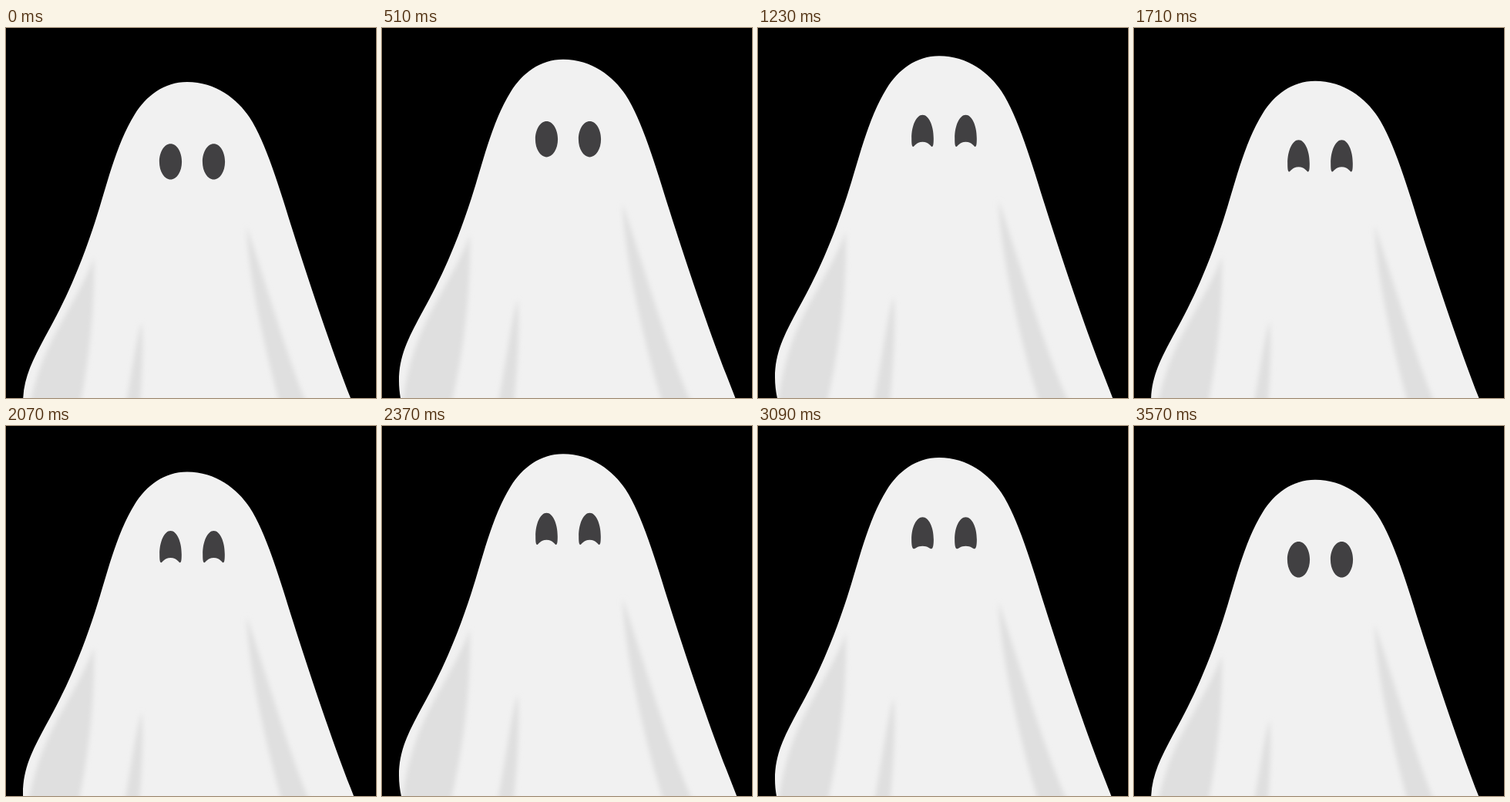
Animation of 480x480 px, one loop 3.6 s. Source, as an HTML page:

```html
<!DOCTYPE html>
<html lang="en">
<head>
<meta charset="utf-8">
<title>Floating ghost</title>
<style>
  html, body { margin: 0; width: 100%; height: 100%; overflow: hidden; background: #000; }
  svg { display: block; width: 100%; height: 100%; }
</style>
</head>
<body>
<svg viewBox="0 0 480 480">
  <defs>
    <path id="body" d="M235 70C272 70 300 92 316 116C337 148 355 208 373 266C392 326 424 422 447 480L468 534H31
      C26 520 22 505 22 487C22 455 34 432 50 402C70 366 92 324 116 250C130 208 142 152 167 112C182 88 205 70 235 70Z"/>
    <clipPath id="inside"><use href="#body"/></clipPath>
    <filter id="soft" filterUnits="userSpaceOnUse" x="0" y="200" width="480" height="360">
      <feGaussianBlur stdDeviation="3"/>
    </filter>
  </defs>
  <g id="ghost">
    <use href="#body" fill="#f1f1f1"/>
    <g clip-path="url(#inside)">
      <g fill="#dfdfdf" filter="url(#soft)">
        <path d="M114 297C105 325 82 362 63 398C46 430 34 465 27 510L20 550H82C98 490 116 400 114 297Z"/>
        <path d="M176 381C169 405 164 440 157 480L145 550H168C174 490 180 430 176 381Z"/>
        <path d="M312 257C314 320 333 405 353 480L374 550H417C375 465 347 360 312 257Z"/>
      </g>
    </g>
    <g fill="#414042">
      <path class="eye" transform="translate(213.5 70)"/>
      <path class="eye" transform="translate(269.5 70)"/>
    </g>
  </g>
</svg>
<script>
  const LOOP = 3600, BOB = 1800, LIFT = 48.6;
  const ghost = document.getElementById("ghost");
  const eyes = document.querySelectorAll(".eye");

  // Right half of an eye, top to bottom: three cubic curves measured from the head top.
  const unitArc = [[0, -1], [.552, -1], [1, -.552], [1, 0], [1, .265], [.895, .52],
                   [.707, .707], [.52, .895], [.265, 1], [0, 1]];
  const open = unitArc.map(([x, y]) => [x * 14.6, 103.4 + y * 23.2]);
  const happy = [[0, 76.5], [8, 76.5], [14.3, 90], [14.3, 107], [14.3, 112], [14.2, 117.8],
                 [12.2, 117.8], [10.5, 117.8], [8.5, 111.5], [0, 111.5]];

  const smooth = x => {
    x = Math.min(1, Math.max(0, x));
    return x * x * (3 - 2 * x);
  };

  function eyePath(mix) {
    const right = open.map(([x, y], i) => [x + (happy[i][0] - x) * mix, y + (happy[i][1] - y) * mix]);
    const left = right.slice(0, -1).reverse().map(([x, y]) => [-x, y]);
    return `M${right[0]}C${[...right.slice(1), ...left].join(" ")}Z`;
  }

  function draw(now) {
    const t = now % LOOP;
    const rise = smooth(1 - Math.abs(t % BOB * 2 / BOB - 1));
    const smile = smooth((t - 600) / 300) - smooth((t - 3000) / 300);
    ghost.setAttribute("transform", `translate(0 ${-LIFT * rise})`);
    const d = eyePath(smile);
    eyes.forEach(eye => eye.setAttribute("d", d));
  }

  const start = performance.now();
  function frame() {
    draw(performance.now() - start);
    requestAnimationFrame(frame);
  }
  frame();
</script>
</body>
</html>
```
